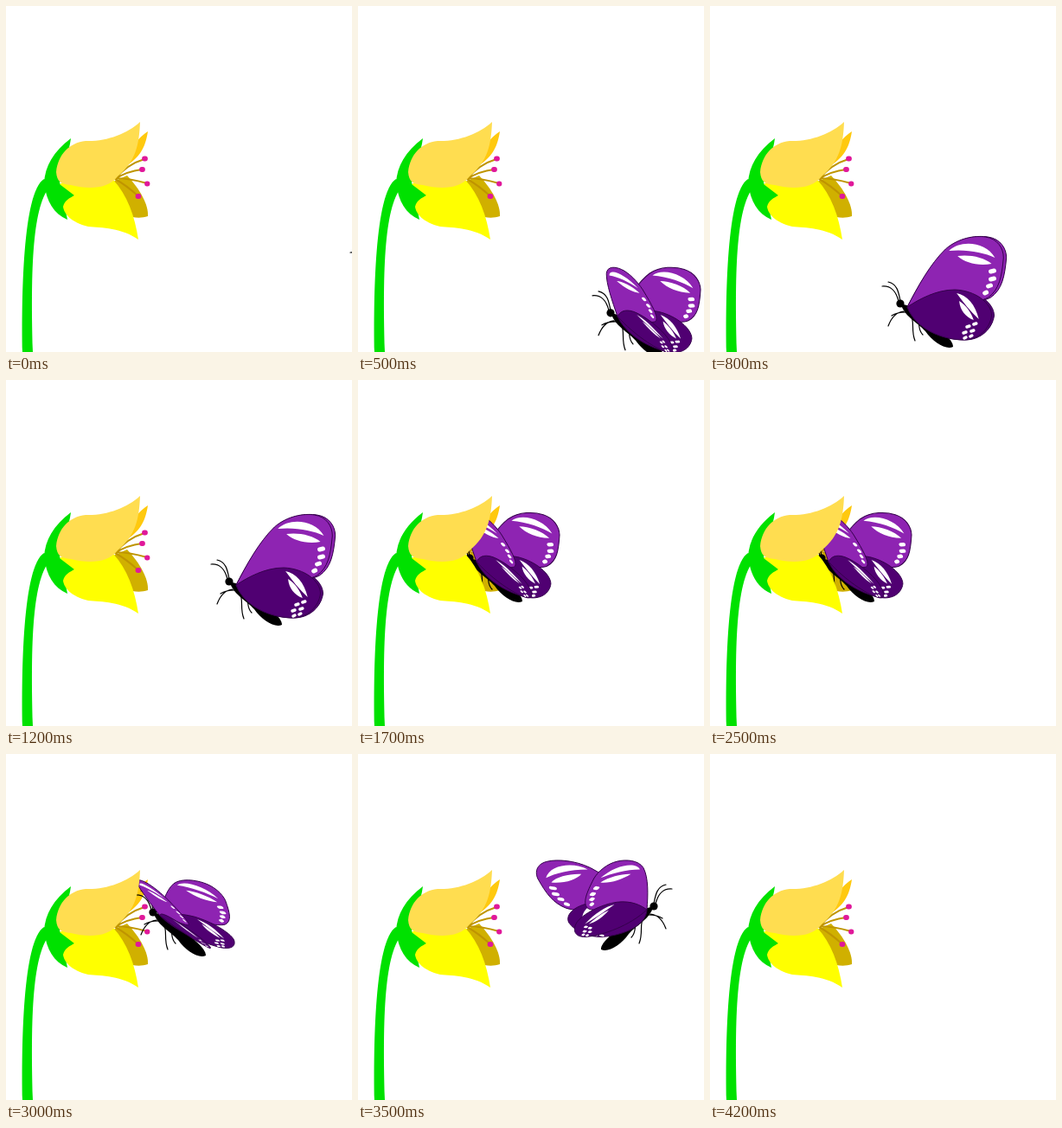
Recreate the animation shown at these times as an HTML page. Size 400x400 px, loop 4900 ms.

```html
<!DOCTYPE html>
<html lang="en">
<head>
<meta charset="utf-8">
<title>Butterfly and flower</title>
<style>
  html, body { margin: 0; width: 100%; height: 100%; overflow: hidden; background: #fff; }
  svg { display: block; width: 100%; height: 100%; }
  .line { fill: none; stroke-linecap: round; }
</style>
</head>
<body>
<svg viewBox="0 0 400 400">
  <defs>
    <!-- Wings are drawn closed, with the wing root at 0,0 -->
    <g id="fore">
      <path fill="#8e24b2" stroke="#35004c" vector-effect="non-scaling-stroke"
        d="M0 0C12-23 27-50 45-67C60-80 80-83 92-81C106-79 113-68 113-57C111-35 108-20 95-11C80-2 30-5 0 0Z"/>
      <path fill="#fff" d="M49-65C62-78 92-76 103-57C90-63 70-67 49-65ZM59-59C72-61 90-58 99-50C84-47 68-51 59-59Z"/>
      <path class="line" stroke="#fff" stroke-width="5" d="M98-41l4-1M98-32l4-1M95-24l3-1M91-16l2-1"/>
    </g>
    <g id="hind">
      <path fill="#500072" stroke="#35004c" vector-effect="non-scaling-stroke"
        d="M0 0C14-9 34-20 56-20C80-19 99-5 99 10C97 25 84 38 66 38C42 38 10 26 0 0Z"/>
      <path fill="#fff" d="M58-16C70-14 80-3 84 14C74 5 66-5 58-16ZM61-7C62 4 69 12 78 15C75 6 69-2 61-7Z"/>
      <path class="line" stroke="#fff" stroke-width="3.500" d="M78 20l3-1M70 23l3-1M75 28l3-1M66 30l3-1M74 34l2-1M67 36l2-1"/>
    </g>
  </defs>

  <path fill="#00e100" d="M19 400C18 340 19 215 44 200L54 205C32 225 28 290 31 400Z"/>
  <path fill="#00e100" d="M75 153C55 168 45 185 44 205C47 226 55 240 71 247L68 232 80 218 62 205C65 185 73 170 75 153Z"/>
  <path fill="#ffc90e" d="M164 145C148 156 140 170 128 196L139 185C154 175 161 165 164 145Z"/>
  <path fill="#d0b000" d="M124 203L140 196C155 212 165 230 164 243C158 245 152 245 146 244Z"/>
  <path class="line" stroke="#bf9500" stroke-width="2"
    d="M126 200Q140 183 160 177M126 200Q140 191 157 189M126 199Q142 199 163 205M126 200Q139 207 153 220"/>
  <path class="line" stroke="#e0189a" stroke-width="5.800" d="M160 176.500h1M157 189h1M163 205.500h.5M152.500 220h1"/>

  <g id="butterfly">
    <path class="line" stroke="#000" stroke-width="1.200"
      d="M-29-24C-18-25-13-18-10-7M-22-29C-12-27-10-18-8-7
         M-4 5Q-16 6-22 22M-2 6Q-12 6-18 10M4 8C9 18 4 26 9 39M12 14C15 20 12 26 18 32"/>
    <circle cx="-8" cy="-4" r="4.600"/>
    <path d="M-7-3C3-3 12 4 18 14C34 21 54 38 53 46C45 50 30 41 21 28C12 18-4 10-7-3Z"/>
  </g>

  <path fill="#ff0" d="M62 206C80 195 105 196 124 201C140 218 149 243 153 270C135 257 110 256 95 255C75 250 67 240 66 232C68 224 74 222 79 219Z"/>
  <path fill="#ffdd50" d="M155 134C140 148 115 157 92 156C73 158 60 172 58 192C59 203 63 206 75 207C95 212 118 212 129 197C150 180 154 160 155 134Z"/>
</svg>
<script>
const STEP = 100, STEPS = 49, TURN = 31, GONE = 42;
const FAR = -1, NEAR = 1;

// One wing beat: closed, opening, open, closing
const beat = [
  { width: 1, height: 1, lean: 0, spread: 0 },
  { width: .7, height: .84, lean: .29, spread: .26 },
  { width: .63, height: .68, lean: .5, spread: .18 },
  { width: .86, height: .77, lean: .06, spread: .4 }
];

// Key points of the flight: step, x, y
const flight = [
  [0, 427, 309], [3, 348, 366], [8, 228, 348], [12, 266, 237], [16, 163, 197],
  [17, 137, 210], [27, 137, 210], [30, 178, 187], [35, 334, 180], [GONE, 525, 70]
];

const butterfly = document.getElementById('butterfly');

function addWing(shape, side) {
  const wing = document.createElementNS('http://www.w3.org/2000/svg', 'use');
  wing.setAttribute('href', '#' + shape);
  butterfly.append(wing);
  return { wing, side, tilt: shape === 'fore' ? .5 : .6, squash: shape === 'fore' ? 1 : 1.5 };
}

const wings = [FAR, NEAR].flatMap(side => ['fore', 'hind'].map(shape => addWing(shape, side)));

function flap({ wing, side, tilt, squash }, { width, height, lean, spread }) {
  const narrow = side * (.515 - .5 * width);
  const matrix = [width - narrow, tilt * (1 - width), lean + side * spread, height ** squash, 0, 0];
  wing.setAttribute('transform', `matrix(${matrix})`);
}

function position(step) {
  const next = Math.max(1, flight.findIndex(key => key[0] >= step));
  const [s0, x0, y0] = flight[next - 1], [s1, x1, y1] = flight[next];
  const k = (step - s0) / (s1 - s0);
  return [x0 + (x1 - x0) * k, y0 + (y1 - y0) * k];
}

function draw() {
  const step = Math.floor((performance.now() - start) / STEP) % STEPS;
  const [x, y] = position(Math.min(step, GONE));
  butterfly.setAttribute('visibility', step < GONE ? 'visible' : 'hidden');
  butterfly.setAttribute('transform', `translate(${x} ${y}) scale(${step < TURN ? 1 : -1} 1)`);
  wings.forEach(wing => flap(wing, beat[step % beat.length]));
  requestAnimationFrame(draw);
}

const start = performance.now();
draw();
</script>
</body>
</html>
```
